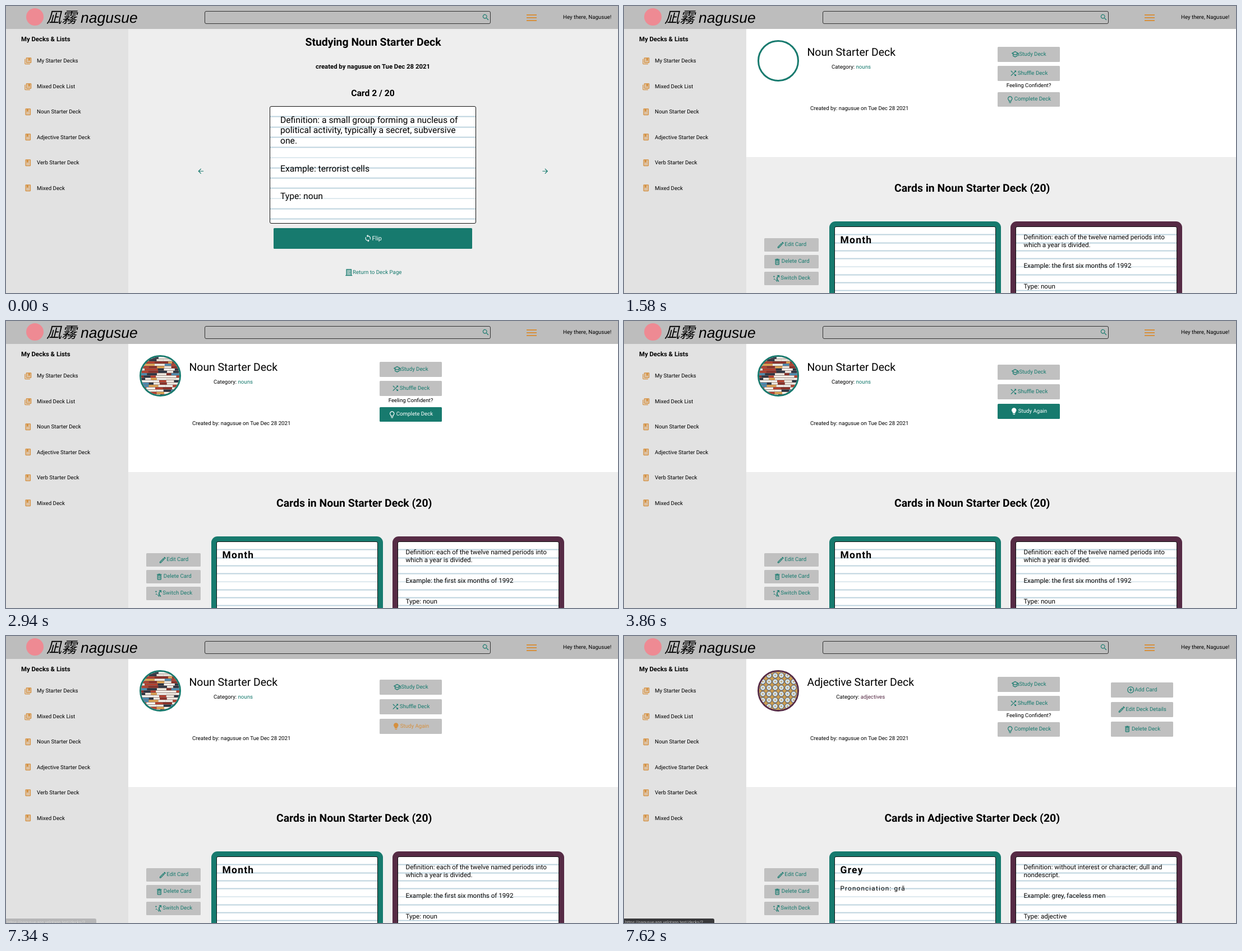
Write an HTML page that moves like this. It is 1091x513 px and loops after 8000 ms.

```html
<!DOCTYPE html>
<html lang="en">
<head>
<meta charset="utf-8">
<title>Flashcard decks</title>
<style>
  :root { --teal: #177a6e; --amber: #d5903f; --plum: #562b45; --grey: #c0c0c0; }
  html, body { margin: 0; width: 100%; height: 100%; overflow: hidden; background: #eee; }
  #stage { position: relative; width: 1091px; height: 513px; overflow: hidden; color: #000;
    font-family: Roboto, "Noto Sans CJK JP", "Noto Sans CJK", sans-serif; text-rendering: geometricPrecision; }
  #stage * { box-sizing: border-box; }
  p, .box, .button, .scene, .glyph { position: absolute; margin: 0; }
  p { line-height: 0; white-space: pre; }
  .mid { transform: translateX(-50%); }
  .bold { font-weight: 700; }
  .logo { font-family: "Liberation Sans", "Noto Sans CJK JP", "Noto Sans CJK", sans-serif; font-style: italic; }
  .scene { inset: 0; }
  .glyph, .button svg { width: 14.5px; height: 14.5px; flex: none; fill: currentColor; fill-rule: evenodd; }
  .button { display: flex; align-items: center; justify-content: center; border-radius: 1.5px;
    background: var(--grey); color: var(--teal); font-size: 9.7px; white-space: pre; }
  .button.on { background: var(--teal); color: #fff; }
  .button.amber { color: var(--amber); }
  .button.link { background: none; }
  .button.on.amber { color: #fff; }
  .paper { border: 1px solid #111; border-radius: 3px;
    background: repeating-linear-gradient(#fff 0 calc(var(--step) - 1.8px), #bdd3de calc(var(--step) - 1.8px) var(--step)) 0 .6px; }
  .cover { border-radius: 50%; border: 3px solid; overflow: hidden; background: #fff; }
  .cover svg { display: block; width: 68px; height: 68px; }
</style>
</head>
<body>
<div id="stage"></div>
<script>
const icons = {
  list: 'M4 6H2v14c0 1.1.9 2 2 2h14v-2H4zM20 2H8c-1.1 0-2 .9-2 2v12c0 1.1.9 2 2 2h12c1.1 0 2-.9 2-2V4c0-1.1-.9-2-2-2zm0 14H8V4h5v8l2.5-1.5L18 12V4h2z',
  book: 'M18 2H6c-1.1 0-2 .9-2 2v16c0 1.1.9 2 2 2h12c1.1 0 2-.9 2-2V4c0-1.1-.9-2-2-2zM6 4h2v8l2.5-1.5L13 12V4h5v16H6z',
  search: 'M15.5 14h-.8l-.3-.3a6.5 6.5 0 1 0-.7.7l.3.3v.8l5 5 1.5-1.5zM9.5 14a4.5 4.5 0 1 1 0-9 4.5 4.5 0 0 1 0 9z',
  menu: 'M3 6h18v2H3zM3 11h18v2H3zM3 16h18v2H3z',
  back: 'M20 11H7.8l5.6-5.6L12 4l-8 8 8 8 1.4-1.4L7.8 13H20z',
  next: 'M12 4l-1.4 1.4 5.6 5.6H4v2h12.2l-5.6 5.6L12 20l8-8z',
  flip: 'M12 4V1L8 5l4 4V6c3.3 0 6 2.7 6 6 0 1-.25 2-.7 2.8l1.5 1.5A8 8 0 0 0 12 4zM12 18c-3.3 0-6-2.7-6-6 0-1 .25-2 .7-2.8L5.2 7.7A8 8 0 0 0 12 20v3l4-4-4-4z',
  door: 'M4 2h16v18h2v2H2v-2h2zM6 4v16h12V4zM14 11h2v2h-2z',
  study: 'M12 3L1 9l4 2.2v6L12 21l7-3.8v-6l2-1.1V17h2V9zM18.8 9L12 12.7 5.2 9 12 5.3zM17 16l-5 2.7L7 16v-3.7l5 2.7 5-2.7z',
  shuffle: 'M10.6 9.2L5.4 4 4 5.4l5.2 5.2zM14.5 4l2 2L4 18.6 5.4 20 18 7.5l2 2V4zM14.8 13.4l-1.4 1.4 3.1 3.1-2 2.1H20v-5.5l-2 2z',
  bulbFull: 'M9 21c0 .5.4 1 1 1h4c.6 0 1-.5 1-1v-1H9zM12 2C8.1 2 5 5.1 5 9c0 2.4 1.2 4.5 3 5.7V17c0 .5.4 1 1 1h6c.6 0 1-.5 1-1v-2.3c1.8-1.3 3-3.4 3-5.7 0-3.9-3.1-7-7-7z',
  edit: 'M14 9l1 1-9 9H5v-1zM17.7 3c-.3 0-.5.1-.7.3l-1.9 1.8 3.8 3.8L20.7 7c.4-.4.4-1 0-1.4l-2.3-2.3c-.2-.2-.5-.3-.7-.3zM14 6.2L3 17.2V21h3.8l11-11z',
  trash: 'M14.5 3h-5l-1 1H5v2h14V4h-3.5zM18 7H6v12c0 1.1.9 2 2 2h8c1.1 0 2-.9 2-2zM8 9h8v10H8zM9.5 10.5H11v7H9.5zM13 10.5h1.5v7H13z',
  swap: 'M4 3l1 2.2L7.2 6 5 7 4 9.2 3 7 1 6l2-.8zM5 11l.8 1.7 1.7.8-1.7.8L5 16l-.8-1.7-1.7-.8 1.7-.8zM20 2v7h-2V5.5C13 9 13 13 19 20l-1.5 1.5C10 14 10 9 16 4h-3V2zM8 15h2l4 5-1.5 1.5z',
  add: 'M13 7h-2v4H7v2h4v4h2v-4h4v-2h-4zM12 2a10 10 0 1 0 0 20 10 10 0 0 0 0-20zM12 20a8 8 0 1 1 0-16 8 8 0 0 1 0 16z'
};
icons.bulb = icons.bulbFull + 'M14.9 13.1l-.9.6V16h-4v-2.3l-.8-.6C7.8 12.2 7 10.6 7 9c0-2.8 2.2-5 5-5s5 2.2 5 5c0 1.6-.8 3.2-2.1 4.1z';
const tinted = { list: 'M7 3h14v14H7z', book: 'M5 3h14v18H5z', door: 'M5 3h14v18H5z' };

const svg = (name, attrs = '') => `<svg viewBox="0 0 24 24" ${attrs}>` +
  (tinted[name] ? `<path d="${tinted[name]}" opacity=".4"/>` : '') + `<path d="${icons[name]}"/></svg>`;
const glyph = (x, y, name, color, size = 14.5) => svg(name,
  `class="glyph" style="left:${x - size / 2}px;top:${y - size / 2}px;width:${size}px;height:${size}px;color:var(--${color})"`);
// y is the vertical middle of the capitals
const text = (x, y, size, str, cls = '', css = '') =>
  `<p class="${cls}" style="left:${x}px;top:${y}px;font-size:${size}px;${css}">${str}</p>`;
const box = (x, y, w, h, css, cls = '', inner = '') =>
  `<div class="box ${cls}" style="left:${x}px;top:${y}px;width:${w}px;height:${h}px;${css}">${inner}</div>`;
const button = (x, y, w, h, icon, label, cls = '', id = '', css = '') =>
  `<div id="${id}" class="button ${cls}" style="left:${x}px;top:${y}px;width:${w}px;height:${h}px;${css}">${svg(icon)}${label}</div>`;
const action = (x, y, icon, label, cls, id) => button(x, y, 110.5, 26.5, icon, label, cls, id);
const scene = (id, inner) => `<div class="scene" id="${id}">${inner}</div>`;

function bookSpines() {
  const colors = ['#b5402f', '#f0ebe2', '#4b8db3', '#f8f6f1', '#2b3442', '#e2a552', '#f3eee6', '#8a2f28'];
  let seed = 11, bars = '';
  const random = () => (seed = seed * 16807 % 2147483647) / 2147483647;
  for (let y = 0; y < 68; y += 4.2)
    for (let x = -8 * random(); x < 68;) {
      const w = 7 + 11 * random();
      bars += `<rect x="${x}" y="${y}" width="${w}" height="3.4" fill="${colors[random() * colors.length | 0]}"/>`;
      x += w;
    }
  return `<svg><rect width="68" height="68" fill="#7d6660"/>${bars}</svg>`;
}
const tiles = () => `<svg><defs><pattern id="tile" x="1" y="1" width="11" height="11" patternUnits="userSpaceOnUse">
  <rect width="11" height="11" fill="#d0a050"/><circle cx="5.5" cy="5.5" r="5.2" fill="#4c5060"/>
  <circle cx="5.5" cy="5.5" r="4.2" fill="#d5e2e6"/><circle cx="5.5" cy="5.5" r="1.3" fill="#c59a55"/>
  </pattern></defs><rect width="68" height="68" fill="url(#tile)"/></svg>`;

const header = box(0, 0, 1091, 40.5, 'background:#bdbdbd') +
  box(36, 4, 31, 31, 'background:#ee8a93;border-radius:50%') +
  text(72, 20.8, 27, '凪霧', 'logo') +
  text(133, 20.8, 26.5, 'nagusue', 'logo') +
  box(354, 8.5, 510, 23.5, 'border:1px solid #333;border-radius:3px') +
  glyph(855.5, 20.5, 'search', 'teal') +
  glyph(937, 20.5, 'menu', 'amber', 24) +
  text(993, 20.5, 9.7, 'Hey there, Nagusue!');

const sidebar = box(0, 40.5, 218, 473, 'background:#e2e2e2') +
  text(27, 58.5, 11.35, 'My Decks &amp; Lists', 'bold') +
  ['My Starter Decks', 'Mixed Deck List', 'Noun Starter Deck', 'Adjective Starter Deck', 'Verb Starter Deck', 'Mixed Deck']
    .map((name, i) => glyph(39.5, 98.5 + 45.4 * i, i < 2 ? 'list' : 'book', 'amber') +
      text(55, 99.3 + 45.45 * i, 9.7, name)).join('');

const study = text(654.5, 65, 19.4, 'Studying Noun Starter Deck', 'bold mid') +
  text(654, 107.7, 11.35, 'created by nagusue on Tue Dec 28 2021', 'bold mid') +
  text(654, 156, 15.7, 'Card 2 / 20', 'bold mid') +
  box(470, 179, 368, 210, '--step:18.27px', 'paper') +
  [[204, 'Definition: a small group forming a nucleus of'], [222.4, 'political activity, typically a secret, subversive'],
    [240.8, 'one.'], [290.5, 'Example: terrorist cells'], [340.3, 'Type: noun']]
    .map(([y, line]) => text(489, y, 15.7, line)).join('') +
  glyph(347, 295.3, 'back', 'teal') + glyph(961.7, 295.3, 'next', 'teal') +
  button(477, 397, 354, 37.4, 'flip', 'Flip', '', 'flip', 'font-size:10.9px') +
  button(600, 468, 109, 17, 'door', 'Return to Deck Page', 'link', 'return');

const freshActions = id => action(666, 73, 'study', 'Study Deck') + action(666, 107.4, 'shuffle', 'Shuffle Deck') +
  text(721.5, 143.3, 9.7, 'Feeling Confident?', 'mid') + action(666, 153.5, 'bulb', 'Complete Deck', '', id);
const doneActions = action(666, 78.3, 'study', 'Study Deck') + action(666, 113, 'shuffle', 'Shuffle Deck') +
  action(666, 148, 'bulbFull', 'Study Again', 'amber', 'again');

const deck = ({ kind, color, category, middle, art, word, sound, lines, extra }) =>
  box(218, 40.5, 873, 229, 'background:#fff') +
  box(238, 60.5, 74, 74, `border-color:var(--${color})`, 'cover', `<div id="${kind}Art">${art}</div>`) +
  text(326.5, 82.7, 19.4, `${kind} Starter Deck`) +
  text(middle, 109.5, 9.7, `Category: <span style="color:var(--${color})">${category}</span>`, 'mid') +
  text(332, 183.5, 9.7, 'Created by: nagusue on Tue Dec 28 2021') + extra +
  text(620.7, 325.8, 19.4, `Cards in ${kind} Starter Deck (20)`, 'bold mid') +
  [['edit', 'Edit Card'], ['trash', 'Delete Card'], ['swap', 'Switch Deck']]
    .map(([icon, label], i) => button(250, 414.7 + 30 * i, 97, 24.4, icon, label)).join('') +
  [[366, 'teal'], [688.7, 'plum']].map(([x, frame]) =>
    box(x, 384.7, 306, 160, `background:var(--${frame});border-radius:11px`) +
    box(x + 9, 394, 288, 150, '--step:14.27px', 'paper')).join('') +
  text(385.5, 419, 17.5, word, 'bold', 'letter-spacing:1.21px') +
  text(385.5, 450.8, 11.64, sound, '', 'letter-spacing:1.21px') +
  [412.8, 426.8, 463.8, 501.3].map((y, i) => text(712.5, y, 11.64, lines[i])).join('');

const nounDeck = deck({
  kind: 'Noun', color: 'teal', category: 'nouns', middle: 405, art: bookSpines(), word: 'Month', sound: '',
  lines: ['Definition: each of the twelve named periods into', 'which a year is divided.',
    'Example: the first six months of 1992', 'Type: noun'],
  extra: scene('fresh', freshActions('complete')) + scene('done', doneActions)
});
const adjectiveDeck = deck({
  kind: 'Adjective', color: 'plum', category: 'adjectives', middle: 421.7, art: tiles(), word: 'Grey', sound: 'Prononciation: grā',
  lines: ['Definition: without interest or character; dull and', 'nondescript.',
    'Example: grey, faceless men', 'Type: adjective'],
  extra: freshActions('') + action(868, 83.2, 'add', 'Add Card') +
    action(868, 118.3, 'edit', 'Edit Deck Details') + action(868, 153, 'trash', 'Delete Deck')
});
const status = box(0, 505, 161, 12, 'background:#38383a;border-radius:0 3px 0 0;color:#c4c4c4', '',
  text(2, 6.5, 7.3, 'https://nagusue-app.velotapp.test/decks/2'));

const $ = id => document.getElementById(id);
$('stage').innerHTML = header + sidebar + scene('study', study) + scene('noun', nounDeck) +
  scene('adjective', adjectiveDeck) + scene('status', status);

const show = (id, on) => { $(id).style.display = on ? '' : 'none'; };
const hover = (id, on) => $(id).classList.toggle('on', on);
// Rises to 1 in whole 40 ms ticks, beginning one tick after start
const fade = (t, start, ticks) => Math.max(0, Math.min(1, Math.floor((t - start) / 40) / ticks));

function render(t) {
  show('study', t < 1580);
  show('noun', t >= 1580 && t < 7540);
  show('adjective', t >= 7540);
  show('fresh', t < 3820);
  show('done', t >= 3820);
  hover('flip', t < 500);
  $('return').classList.toggle('amber', t >= 620);
  hover('complete', t >= 2940);
  hover('again', t < 5380);
  $('NounArt').style.opacity = fade(t, 1580, 3);
  $('AdjectiveArt').style.opacity = fade(t, 7540, 2);
  $('status').style.opacity = fade(t, 7300, 4);
}
function tick() {
  render(performance.now() % 8000);
  requestAnimationFrame(tick);
}
tick();
</script>
</body>
</html>
```
